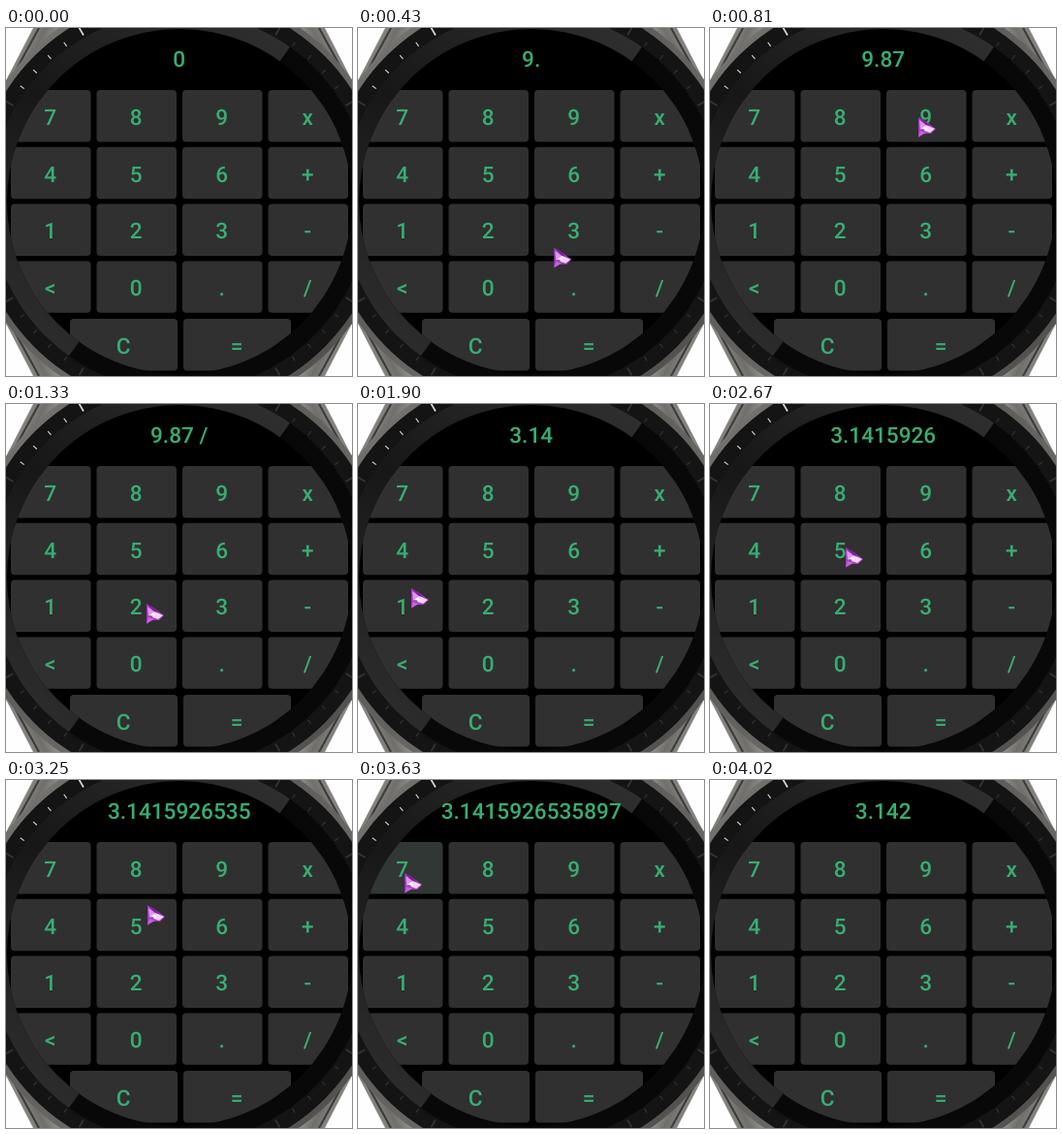
An HTML page for the animation above (4330 ms loop, 357 by 359 pixels).

```html
<!DOCTYPE html>
<html lang="en">
<head>
<meta charset="utf-8">
<title>Watch calculator</title>
<style>
  html, body { margin: 0; width: 100%; height: 100%; overflow: hidden; background: #fefefe; }
  svg { display: block; width: 357px; height: 359px; }
  text {
    font: 500 22.6px Roboto, sans-serif;
    fill: #37ae70;
    text-anchor: middle;
    text-rendering: geometricPrecision;
  }
</style>
</head>
<body>
<svg viewBox="0 0 357 359">
  <defs>
    <linearGradient id="steel" x1="0" y1="0" x2="1" y2="1">
      <stop offset="0" stop-color="#8f8e8b"/>
      <stop offset=".3" stop-color="#55544f"/>
      <stop offset=".6" stop-color="#6a6966"/>
      <stop offset="1" stop-color="#464543"/>
    </linearGradient>
    <linearGradient id="lug" x1="0" y1="0" x2="1" y2=".5">
      <stop offset="0" stop-color="#b5b4b1"/>
      <stop offset=".3" stop-color="#6f6e6b"/>
      <stop offset=".45" stop-color="#a3a29f"/>
      <stop offset="1" stop-color="#3b3a38"/>
    </linearGradient>
    <linearGradient id="sheen" gradientUnits="userSpaceOnUse" x1="290" y1="22" x2="66" y2="330">
      <stop offset="0" stop-color="#2e2e2e"/>
      <stop offset=".5" stop-color="#171717"/>
      <stop offset="1" stop-color="#2b2b2b"/>
    </linearGradient>
    <clipPath id="screen"><circle cx="179" cy="179" r="178"/></clipPath>
    <clipPath id="lit"><path d="M0 0H307L50 359H0Z"/></clipPath>
  </defs>
  <g id="lugs"></g>
  <circle cx="179" cy="179" r="218" fill="url(#steel)"/>
  <circle cx="179" cy="179" r="212" fill="#141414"/>
  <g id="ticks"></g>
  <circle cx="179" cy="179" r="196" fill="#080808"/>
  <circle cx="179" cy="179" r="196" fill="url(#sheen)" clip-path="url(#lit)"/>
  <circle cx="179" cy="179" r="178" fill="#000"/>
  <g id="keys" clip-path="url(#screen)"></g>
  <text id="display" x="178.7" y="40.3">0</text>
  <g id="gem">
    <path d="M0 0L7 4L18 12L13 17L6 17L0 21Z" fill="#a23bc0"/>
    <path d="M1 3L9 9L2 13Z" fill="#df96ec"/>
    <path d="M8 8L17 12L12 16L6 14Z" fill="#f4d5f8"/>
    <path d="M0 20L2 14L8 16Z" fill="#cb5fdd"/>
    <path d="M0 0L7 4L12 9L8 8Z" fill="#7c1d9c"/>
    <path d="M3 12L7 9L9 13Z" fill="#fff"/>
  </g>
</svg>
<script>
const LOOP = 4330, START = 50, TICK = 64.03, LAST = 62;
const $ = id => document.getElementById(id);

function add(parent, tag, attrs, label = '') {
  const el = document.createElementNS('http://www.w3.org/2000/svg', tag);
  for (const name in attrs) el.setAttribute(name, attrs[name]);
  el.textContent = label;
  return parent.appendChild(el);
}

// Watch case
for (const sx of [1, -1]) for (const sy of [1, -1]) {
  const corner = add($('lugs'), 'g', {
    transform: `translate(${sx < 0 ? 357 : 0} ${sy < 0 ? 359 : 0}) scale(${sx} ${sy})`
  });
  add(corner, 'path', { d: 'M0 54L28 0H110V40L30 110H0Z', fill: 'url(#lug)' });
  add(corner, 'path', { d: 'M0 62L34 0', stroke: '#3a3937', 'stroke-width': 2 });
}
for (let a = 0; a < 360; a += 6) {
  const bright = a > 305 && a < 352;
  add($('ticks'), 'path', {
    d: `M179 ${a % 30 ? -24 : -28}V-19`,
    stroke: bright ? '#d0d0d0' : '#343434',
    'stroke-width': a % 30 ? 1.2 : 1.8,
    transform: `rotate(${a} 179 179)`
  });
}

// Keypad
const keys = {};
function addKey(label, x, y, w) {
  const box = { x, y, width: w, height: 53.4, rx: 4 };
  add($('keys'), 'rect', { ...box, fill: '#303030' });
  const glow = add($('keys'), 'rect', { ...box, fill: '#37ae70', opacity: 0 });
  add($('keys'), 'text', { x: x + w / 2 - .5, y: y + 35.8 }, label);
  keys[label] = { x: x + w / 2 + 2, y: y + 32, glow };
}
['789x', '456+', '123-', '<0./'].forEach((row, r) =>
  [...row].forEach((label, c) => addKey(label, 5 + c * 88.5, 64 + r * 58.8, 82.5)));
addKey('C', 66, 300, 111);
addKey('=', 183, 300, 111);

// Pointer stops: [tick, key] presses a key, [tick, x, y] only passes by
const stops = [
  [0, 196, 170], [2, '9'], [5, '.'], [8, '8'], [10, '7'], [12, 215, 92],
  [15, '/'], [18, 222, 214], [20, 145, 206], [22, '3'], [24, '.'], [26, '1'],
  [28, '4'], [29, 55, 190], [30, '1'], [32, '5'], [35, '9'], [38, '2'],
  [40, '6'], [41, 140, 148], [42, '5'], [45, '3'], [48, '5'], [50, 146, 129],
  [51, '8'], [54, '9'], [56, '7'], [58, '9'], [61, '=']
].map(([at, a, b]) => b === undefined
  ? { at, key: a, x: keys[a].x, y: keys[a].y }
  : { at, x: a, y: b });
const presses = stops.filter(s => s.key);

function readout(tick) {
  let entry = '', left = 0, fresh = true;
  for (const { at, key } of presses) {
    if (at > tick) break;
    if (key === '/') {
      left = +entry;
      entry += ' /';
      fresh = true;
    } else if (key === '=') {
      entry = (left / entry).toPrecision(4);
    } else {
      entry = fresh ? key : entry + key;
      fresh = false;
    }
  }
  return entry || '0';
}

function pointer(tick) {
  const i = Math.max(1, stops.findIndex(s => s.at >= tick));
  const a = stops[i - 1], b = stops[i];
  const p = (tick - a.at) / (b.at - a.at), e = p * p * (3 - 2 * p);
  return [a.x + (b.x - a.x) * e, a.y + (b.y - a.y) * e];
}

function draw(t) {
  const tick = t < START ? -1 : Math.floor((t - START + 9) / TICK);
  const shown = tick >= 0 && tick < LAST;
  $('display').textContent = readout(tick);
  $('gem').style.display = shown ? '' : 'none';
  if (shown) $('gem').setAttribute('transform', `translate(${pointer(tick)})`);

  const pressed = presses.find(s => s.at === tick);
  for (const label in keys) {
    keys[label].glow.setAttribute('opacity', pressed && pressed.key === label ? .05 : 0);
  }
}

const begin = performance.now();
function frame() {
  draw((performance.now() - begin) % LOOP);
  requestAnimationFrame(frame);
}
frame();
</script>
</body>
</html>
```
